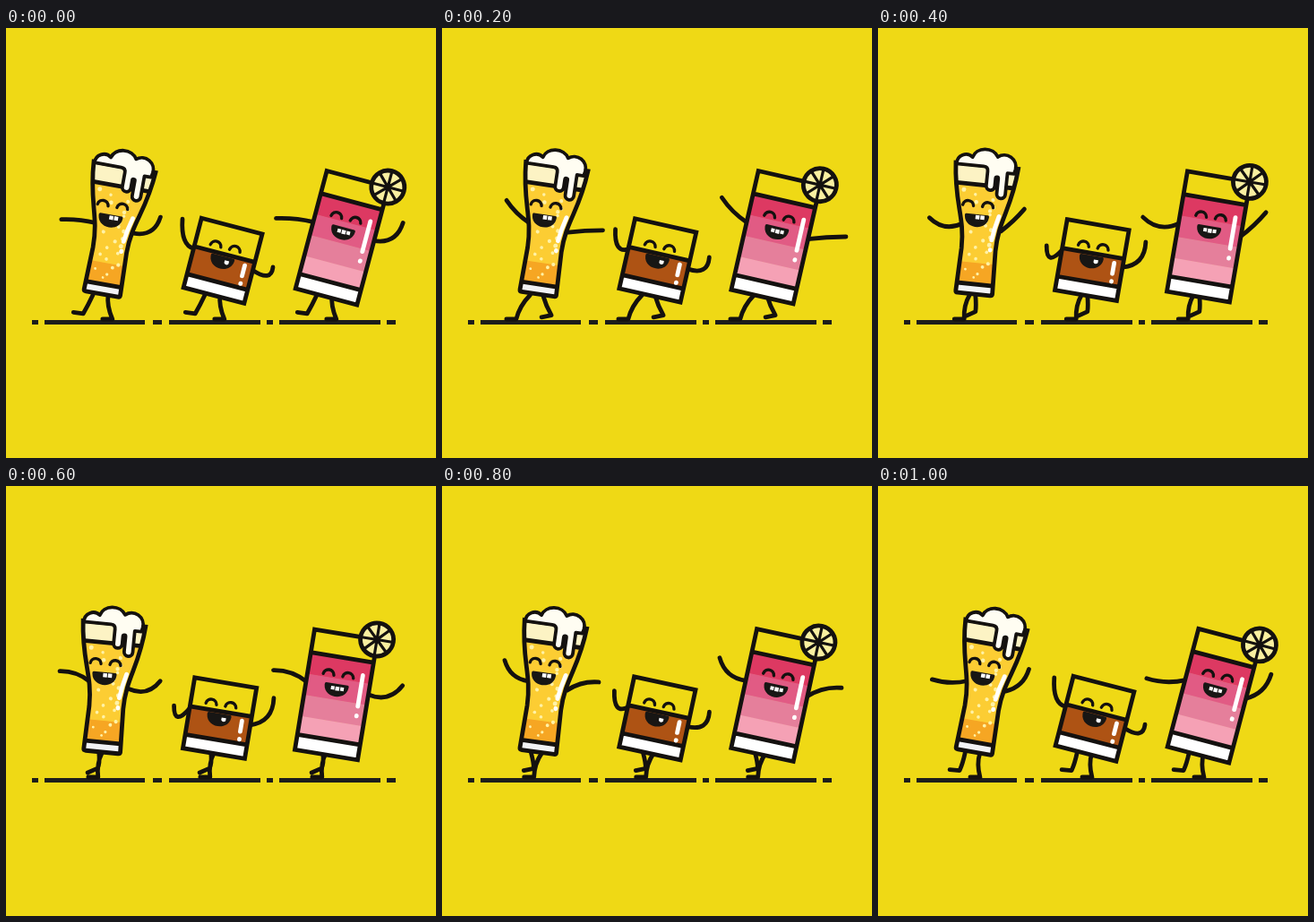
Write an HTML page that moves like this. It is 480x480 px and loops after 1070 ms.

```html
<!DOCTYPE html>
<html lang="en">
<head>
<meta charset="utf-8">
<title>Dancing drinks</title>
<style>
  html, body { margin: 0; width: 100%; height: 100%; overflow: hidden; background: #efd915; }
  svg { display: block; width: 100vw; height: 100vh; }
  .ink, .glass { fill: none; stroke: #14110f; stroke-width: 4.8; stroke-linecap: round; stroke-linejoin: round; }
  .glass { stroke-linejoin: miter; }
  .eyes { stroke-width: 3.4; }
  .spokes { stroke-width: 3.2; }
  .foam { fill: #fffdf2; stroke-width: 3.8; }
  .shine { fill: none; stroke: #fff; stroke-width: 4.8; stroke-linecap: round; }
  .ground { stroke: #1d1d1b; stroke-width: 5; }
  .tooth { fill: #fff; }
</style>
</head>
<body>
<svg viewBox="0 0 480 480">
  <defs>
    <g id="face">
      <path class="ink eyes" d="M-17,-10 c1,-7 11,-7 12,0 M5,-10 c1,-7 11,-7 12,0"/>
      <path fill="#181614" d="M-12,-1 H12 Q14,-1 13.5,2 C12,17 -12,17 -13.5,2 Q-14,-1 -12,-1 Z"/>
    </g>
    <path id="pint" d="M-35,-144 C-32,-98 -19,-86 -19,-50 L-20.5,-2 Q-20.5,0 -18,0 H18 Q20.5,0 20.5,-2 L19,-50 C19,-86 32,-98 35,-144 Z"/>
    <clipPath id="pintClip"><use href="#pint"/></clipPath>
  </defs>

  <path class="ground" d="M29,328.4 h7 M43,328.4 h112 M164,328.4 h10 M182,328.4 h102 M291,328.4 h7 M305,328.4 h113 M425,328.4 h10"/>
  <g id="limbs"></g>

  <g id="beer">
    <g clip-path="url(#pintClip)">
      <rect x="-40" y="-145" width="80" height="24" fill="#fcf3c4"/>
      <rect x="-40" y="-122" width="80" height="90" fill="#fccd33"/>
      <rect x="-40" y="-35" width="80" height="28" fill="#f6a623"/>
      <g id="bubbles" fill="#fff2a6"></g>
      <rect x="-40" y="-10" width="80" height="11" fill="#f2f2f4"/>
      <path class="glass" d="M-40,-122 H40 M-30,-11 H30"/>
    </g>
    <use href="#pint" class="glass"/>
    <path class="shine" d="M19,-89 Q15,-75 13.5,-62 M13,-51 v.5"/>
    <path class="ink foam" d="M-34,-143 a10.5,10.5 0 0 1 17,-9 a15,13 0 0 1 28,-3 a13,13 0 0 1 21,12 L31,-138 H23.5 V-114 a4.8,4.8 0 0 1 -9.6,0 V-131 a1.5,1.5 0 0 0 -3,0 V-122 a4.8,4.8 0 0 1 -9.6,0 V-138 q0,-5 -5,-5 Z"/>
    <use href="#face" x="-5.5" y="-88"/>
    <path class="tooth" d="M-7,-88 h4.5 v4.5 h-4.5 z M-1.5,-88 h4.5 v4.5 h-4.5 z"/>
  </g>

  <g id="whisky">
    <rect x="-35" y="-48" width="70" height="33" fill="#ae5314"/>
    <rect x="-35" y="-15" width="70" height="15" fill="#fff"/>
    <path class="glass" d="M-35,-80 H35 V0 H-35 Z M-35,-47.5 H35 M-35,-15.5 H35"/>
    <path class="shine" d="M25,-41 V-29 M25.5,-20.5 v.3"/>
    <use href="#face" x="-1" y="-44"/>
    <path class="tooth" d="M2,-41 h5 v3 q-2.5,3 -5,0 z"/>
  </g>

  <g id="punch">
    <g id="layers"></g>
    <rect x="-35.5" y="-17" width="71" height="17" fill="#fff"/>
    <path class="glass" d="M-35.5,-136 H35.5 V0 H-35.5 Z M-35.5,-110 H35.5 M-35.5,-17 H35.5"/>
    <path class="shine" d="M26,-94 V-59 M26.3,-48.5 v.5"/>
    <use href="#face" x="-1" y="-79"/>
    <path class="tooth" d="M-7,-77 h4 v4 h-4 z M-2,-77 h4.5 v4.5 h-4.5 z M3.5,-77 h4 v4 h-4 z"/>
    <g transform="translate(35,-136)">
      <circle class="glass" r="18.5" style="fill:#f9efa0"/>
      <path id="spokes" class="ink spokes"/>
    </g>
  </g>
</svg>

<script>
const LOOP = 1070, STEPS = 16;
const $ = id => document.getElementById(id);
const add = (parent, tag, attrs) => {
  const el = document.createElementNS('http://www.w3.org/2000/svg', tag);
  for (const name in attrs) el.setAttribute(name, attrs[name]);
  return parent.appendChild(el);
};
const mix = (a, b, t) => a.map((v, i) => v + (b[i] - v) * t);
const wave = (step, period) => Math.cos(step * 2 * Math.PI / period);
const curve = (from, knee, to) => `M${from} Q${knee} ${to}`;

const drinks = [
  { id: 'beer', x: 107, y: 297, tilt: 5.3, sway: 4.9, left: [-21, -77], right: [23, -73], reach: 1 },
  { id: 'whisky', x: 232, y: 298.5, tilt: 9.2, sway: 5.4, left: [-35, -45], right: [35, -38] },
  { id: 'punch', x: 357.5, y: 300, tilt: 9, sway: 5.9, left: [-35, -77], right: [35, -74], reach: 1.1 }
];
drinks.forEach((d, i) => {
  d.body = $(d.id);
  d.shift = i * 125;
  d.limbs = add($('limbs'), 'path', { class: 'ink' });
});

['#dd3962', '#e15b84', '#e57f9b', '#f5a1b5'].forEach((fill, i) =>
  add($('layers'), 'rect', { x: -35.5, y: -110 + i * 24, width: 71, height: 24.5, fill }));

$('spokes').setAttribute('d', [0, 45, 90, 135].map(deg => {
  const x = 17 * wave(deg, 360), y = 17 * wave(deg - 90, 360);
  return `M${x},${y} L${-x},${-y}`;
}).join(''));

let seed = 7;
const random = () => (seed = seed * 16807 % 2147483647) / 2147483647;
for (let i = 0; i < 24; i++) {
  const cy = -115 + i * 4.2;
  const half = cy < -90 ? 23 : 14;
  const size = cy > -35 ? 1.2 : 1.5;
  add($('bubbles'), 'circle', { cx: (random() * 2 - 1) * half, cy, r: size + random() * size * .7 });
}

function place(d, [x, y], deg) {
  const c = wave(deg, 360), s = wave(deg - 90, 360);
  return [d.x + x * c - y * s, d.y + x * s + y * c];
}

// The hand swings along a slanted line while the elbow follows later.
function arm([x, y], side, step, size) {
  const w = side * wave(step - (side < 0 ? 3.2 : 2.5), 8);
  const hx = side * (32.5 + 7 * w) * size, hy = (-13.5 + 12 * w) * size;
  const bend = (4.5 + 11 * wave(step - (side < 0 ? 5.1 : .3), 8)) * size / Math.hypot(hx, hy);
  const elbow = [x + hx / 2 - side * hy * bend, y + hy / 2 + side * hx * bend];
  return curve([x, y], elbow, [x + hx, y + hy]);
}

// One leg walks a full stride in two loops: on the ground first, then in the air.
function leg(u, shift) {
  const hip = shift + 105.5 - 8.5 * wave(u, 32);
  const heel = shift + 102.5 - 15 * wave(u - 2, 32) + 6 * wave(u - 7.3, 32 / 3);
  const lift = 10 * Math.sqrt(Math.max(0, -wave(u - 10, 32)));
  const toeDrop = .6 * lift * wave(u - 22, 32);
  const y = 325 - lift;
  const knee = [(hip + heel) / 2 - 4 + lift * .6, 310];
  return curve([hip, 298], knee, [heel, y]) + ` L${heel - 11},${y + toeDrop}`;
}

function draw(step) {
  const lean = .5 + .5 * wave(step + .2, STEPS);
  for (const d of drinks) {
    const deg = d.tilt + d.sway * lean;
    d.body.setAttribute('transform', `translate(${d.x},${d.y}) rotate(${deg})`);
    const l = place(d, d.left, deg), r = place(d, d.right, deg);
    const arms = d.reach
      ? arm(l, -1, step, d.reach) + arm(r, 1, step, d.reach)
      : curve(l, mix([187, 270], [195, 242], lean), mix([187, 247], [197, 213], lean)) +
        curve(r, mix([298, 262], [296, 284], lean), mix([299, 235], [298, 267], lean));
    d.limbs.setAttribute('d', arms + leg(step, d.shift) + leg(step + STEPS, d.shift));
  }
}

// Poses change on a 10 ms grid, sixteen per loop.
const starts = Array.from({ length: STEPS }, (_, i) => Math.round(i * 20 / 3) * 10);
function tick() {
  const t = performance.now() % LOOP;
  draw(starts.filter(s => s <= t).length - 1);
  requestAnimationFrame(tick);
}
tick();
</script>
</body>
</html>
```
